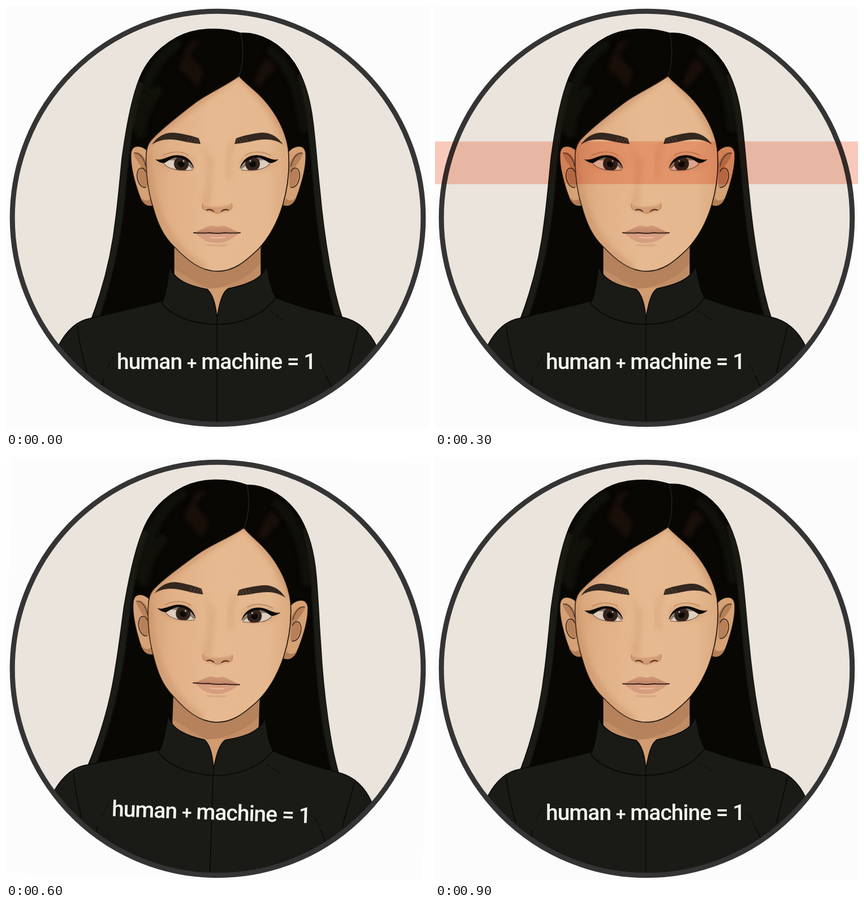
These frames come from a looping animation (748 by 748 pixels, 1200 ms). An HTML page:

```html
<!DOCTYPE html>
<html lang="en">
<head>
<meta charset="utf-8">
<title>Portrait scan</title>
<style>
  html, body { margin: 0; width: 100%; height: 100%; overflow: hidden; background: #fefefe; }
  svg { display: block; width: 100vw; height: 100vh; }
  #band { mix-blend-mode: multiply; }
  text { font: 500 39px Roboto, Inter, sans-serif; letter-spacing: -1px; }
  .plus { font-size: 32px; }
</style>
</head>
<body>
<svg viewBox="0 0 748 748" stroke-linecap="round" stroke-linejoin="round">
  <defs>
    <clipPath id="disc"><ellipse cx="374.5" cy="374.5" rx="364" ry="366"/></clipPath>
    <clipPath id="faceClip"><use href="#face"/></clipPath>
    <clipPath id="hairClip"><use href="#hair"/></clipPath>
    <clipPath id="eyeClip"><use href="#eyeShape"/></clipPath>
    <filter id="soft" x="-50%" y="-50%" width="200%" height="200%"><feGaussianBlur stdDeviation="5"/></filter>
    <filter id="fine" x="-50%" y="-50%" width="200%" height="200%"><feGaussianBlur stdDeviation="1.6"/></filter>
    <linearGradient id="skin">
      <stop offset="0" stop-color="#d6a278"/>
      <stop offset=".16" stop-color="#e1b087"/>
      <stop offset=".45" stop-color="#e6b990"/>
      <stop offset=".85" stop-color="#e5b88f"/>
      <stop offset="1" stop-color="#dba97e"/>
    </linearGradient>
    <linearGradient id="upperLip" x2="0" y2="1">
      <stop stop-color="#d49b7b"/><stop offset="1" stop-color="#bd8267"/>
    </linearGradient>

    <path id="hair" d="M415 48C378 36 333 39 303 55C270 73 248 98 236 128C220 168 211 225 205 270C201 310 198 345 194 375C188 430 176 488 150 556L596 556C584 520 578 488 572 455C565 415 559 370 555 325C551 290 548 245 543 205C539 172 530 132 510 101C487 67 450 46 415 48Z"/>
    <path id="face" d="M412 124C385 143 354 156 332 173C304 195 275 217 260 234C249 244 247 255 248 280C249 310 254 337 260 355C268 384 278 407 297 425C323 452 345 469 374 469C402 469 421 454 446 430C468 407 481 380 490 350C499 318 502 282 499 252C494 220 477 190 458 168C442 149 424 138 412 124Z"/>
    <path id="eyeShape" d="M274 274C286 270 294 266 304 266C319 266 328 276 332 288C320 293 299 292 287 286C281 282 277 278 274 274Z"/>

    <g id="ear">
      <path d="M252 258C240 245 223 244 221 260C219 284 228 313 235 333C241 350 253 358 263 351Z" fill="#d5a175" stroke="#15100b" stroke-width="1.5"/>
      <path d="M226 261C233 254 243 263 250 278V320C243 323 236 315 234 303C232 292 238 286 241 287C236 279 229 272 226 261Z" fill="#b78059"/>
      <path d="M247 321C236 322 229 304 233 292C236 284 244 285 247 293" fill="none" stroke="#31231a" stroke-width="1.5"/>
      <path d="M227 260C237 259 244 270 247 283" fill="none" stroke="#4b3424" stroke-width="1.4"/>
      <path d="M237 337C245 347 252 344 256 340L261 352C250 356 242 350 237 337Z" fill="#b57d55"/>
    </g>

    <g id="eye">
      <ellipse cx="301" cy="276" rx="32" ry="14" fill="#c99068" opacity=".4" filter="url(#soft)"/>
      <use href="#eyeShape" fill="#dccdbd"/>
      <g clip-path="url(#eyeClip)">
        <circle cx="310" cy="279" r="13" fill="#32231c"/>
        <circle cx="310" cy="279" r="6" fill="#0d0907"/>
        <path d="M274 271Q305 256 332 286L330 289Q306 267 276 275Z" fill="#382a23" opacity=".5"/>
      </g>
      <path d="M264 271C274 274 284 267 295 264.500C314 261 328 270 333 288C326 276 315 268 303 268C291 268 285 276 279 278C272 277 267 274 264 271Z" fill="#0b0907"/>
      <path d="M279 278C285 288 305 293 330 290" fill="none" stroke="#77513c" stroke-width="1.2"/>
      <path d="M278 264C291 257 309 255 323 264" fill="none" stroke="#a97755" stroke-width="1.2"/>
      <circle cx="314" cy="274" r="1.5" fill="#cdbfb0"/>
    </g>

    <g id="brow">
      <path d="M258 245C268 230 282 223 297 224C314 226 331 230 341 234L344 244C325 243 306 236 289 236C277 236 267 239 258 245Z" fill="#34271f"/>
      <path d="M326 241l5-9m1 10l5-9m1 10l2-8m-20 6l4-8" stroke="#66493a" stroke-width="1"/>
    </g>
  </defs>

  <g id="portrait">
    <rect width="748" height="748" fill="#fcfcfc"/>
    <ellipse cx="374.5" cy="374.5" rx="365" ry="367" fill="#ebe4dd"/>
    <g clip-path="url(#disc)">
      <use href="#hair" fill="#080704" stroke="#050503" stroke-width="1.5"/>
      <g clip-path="url(#hairClip)" fill="none">
        <g stroke="#1b1a15" stroke-width="12" filter="url(#fine)">
          <path d="M236 140C219 200 212 250 207 310C201 395 186 470 160 548"/>
          <path d="M522 125C540 190 544 260 551 335C559 420 570 480 588 548"/>
        </g>
        <path d="M300 68C262 95 238 148 230 215M268 150C252 170 242 190 238 225M470 80C505 110 520 150 527 215" stroke="#171611" stroke-width="18" opacity=".7" filter="url(#soft)"/>
        <g fill="#28160f" opacity=".6" filter="url(#soft)">
          <path d="M324 65L348 59L324 85L350 117L338 146L326 128L306 111L315 86Z"/>
          <path d="M460 91L478 109L465 121L449 143L437 137L447 113Z"/>
        </g>
        <path d="M415 48C421 73 420 104 412 124" stroke="#3a2b20" stroke-width="1"/>
      </g>

      <path d="M297 410H451V500L374 563L297 500Z" fill="#c18d65"/>
      <path d="M297 424C325 453 347 469 374 469C401 469 425 451 451 426V454C426 485 395 493 365 501C340 494 320 477 297 466Z" fill="#b5825c"/>
      <path d="M357 500L393 497L374 553Z" fill="#d09c70"/>
      <path d="M297 424V490M451 428V485" stroke="#17110c" stroke-width="1.5"/>

      <use href="#ear"/>
      <use href="#ear" transform="translate(751) scale(-1 1)"/>
      <use href="#face" fill="url(#skin)" stroke="#15100b" stroke-width="1.6"/>
      <g clip-path="url(#faceClip)">
        <path d="M414 118C370 151 295 197 246 247M411 121C448 156 481 194 502 245" fill="none" stroke="#bb8058" stroke-width="9" opacity=".55" filter="url(#soft)"/>
        <path d="M248 265C250 350 285 425 345 462" fill="none" stroke="#c68f66" stroke-width="15" opacity=".5" filter="url(#soft)"/>
        <path d="M344 242C357 264 358 293 352 327L346 349L361 354L365 274Z" fill="#cf976d" opacity=".45" filter="url(#soft)"/>
        <path d="M402 244C391 261 391 281 395 301" fill="none" stroke="#d29b70" stroke-width="8" opacity=".45" filter="url(#soft)"/>
      </g>

      <use href="#brow"/>
      <use href="#brow" transform="translate(748) scale(-1 1)"/>
      <use href="#eye"/>
      <use href="#eye" transform="translate(746) scale(-1 1)"/>

      <path d="M347 350C346 360 353 365 362 364L374 368L386 364C397 364 402 358 399 349C390 356 355 358 347 350Z" fill="#c98f67" opacity=".7" filter="url(#fine)"/>
      <path d="M348 349C346 355 348 360 353 361M399 349C401 355 399 360 394 361M367 364Q374 368 381 364" fill="none" stroke="#b57f5b" stroke-width="1.2"/>
      <path d="M355 361Q361 358 367 363M381 363Q387 358 393 361" fill="none" stroke="#553323" stroke-width="2"/>

      <path d="M332 401C346 396 357 388 365 388Q374 392 382 388C392 389 402 397 414 401Q374 405 332 401Z" fill="url(#upperLip)"/>
      <path d="M335 402Q374 405 412 402C399 413 389 419 373 419C356 419 347 413 335 402Z" fill="#d69d80"/>
      <path d="M362 409Q373 411 386 409" fill="none" stroke="#e7b79b" stroke-width="2.5"/>
      <path d="M332 401Q347 402 360 401Q374 403 387 401Q400 402 414 401" fill="none" stroke="#3b221a" stroke-width="2"/>
      <path d="M357 422Q374 426 390 422" fill="none" stroke="#c48b65" stroke-width="3" opacity=".55" filter="url(#fine)"/>

      <g stroke="#060604" stroke-width="1.4">
        <path d="M278 521C230 534 180 545 150 552C125 556 107 574 93 600L60 750H690L656 603C643 575 622 556 594 550C550 541 510 529 474 515L373 563Z" fill="#1a1a16"/>
        <path d="M290 459C286 484 284 510 275 526C298 552 337 563 373 563C414 563 453 548 477 516C467 498 465 478 461 459C453 485 420 494 392 500C381 508 377 529 373 551C371 528 366 510 356 501C326 495 295 485 290 459Z" fill="#1a1a16"/>
        <path d="M373 550V738M126 567C129 595 136 622 143 647M623 567C617 595 610 621 604 647M172 660L168 680M566 654L578 678" fill="none"/>
        <path d="M467 540L490 556M190 620L178 642M555 632L565 650" fill="none" stroke-dasharray="7 4" opacity=".65"/>
      </g>
      <text x="196" y="641.5" fill="#f6f4ef">human <tspan class="plus">+</tspan> machine = 1</text>
    </g>
    <ellipse cx="374.5" cy="374.5" rx="363.300" ry="365.300" fill="none" stroke="#343434" stroke-width="9"/>
  </g>
  <rect id="band" y="239.5" width="748" height="75.5" fill="#fccdbd"/>
</svg>
<script>
  const STEP = 300;
  const TILT = 2;
  const portrait = document.getElementById("portrait");
  const band = document.getElementById("band");

  function render(ms) {
    const step = Math.floor(ms / STEP) % 4;
    band.setAttribute("visibility", step === 1 ? "visible" : "hidden");
    portrait.setAttribute("transform", `rotate(${step === 2 ? TILT : 0} 374 374)`);
  }

  const start = performance.now();
  function tick() {
    render(performance.now() - start);
    requestAnimationFrame(tick);
  }
  tick();
</script>
</body>
</html>
```
